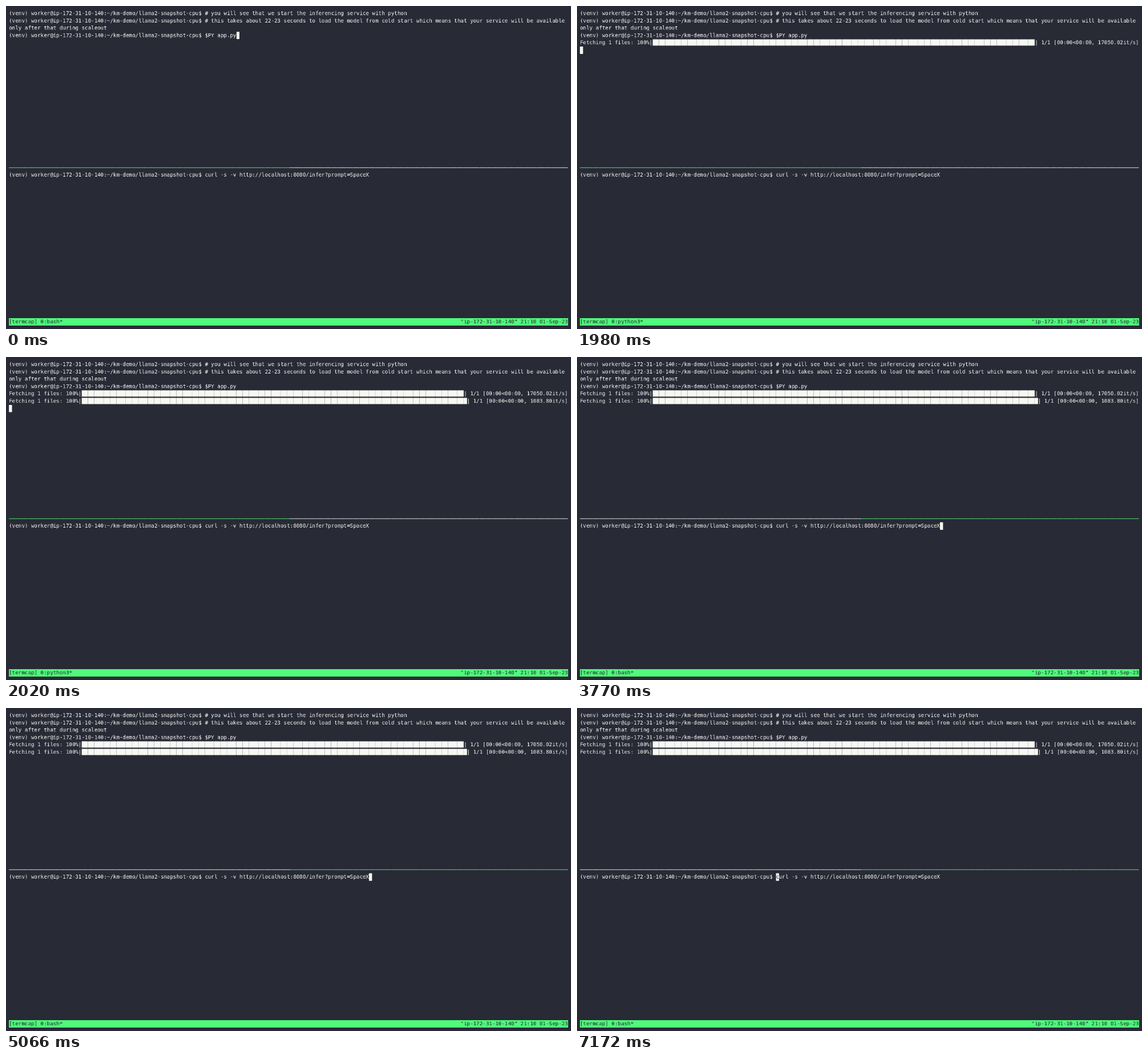
These frames come from a looping animation (990 px wide and 566 px high, 8 s). An HTML page with a canvas:

```html
<!DOCTYPE html>
<html lang="en">
<head>
<meta charset="utf-8">
<title>Terminal session</title>
<style>
  html, body { margin: 0; width: 100%; height: 100%; overflow: hidden; background: #282a36; }
  canvas { display: block; width: 990px; height: 566px; }
</style>
</head>
<body>
<canvas id="screen" width="1508" height="862"></canvas>
<script>
const ctx = document.getElementById('screen').getContext('2d');
const BG = '#282a36', FG = '#f8f8f2', GREEN = '#50fa7b', BLACK = '#21222c';
const COLS = 177, HALF = 89, LOOP = 8000;
const FONT = '14px "DejaVu Sans Mono", monospace';
const PROMPT = '(venv) worker@ip-172-31-10-140:~/km-demo/llama2-snapshot-cpu$ ';
const CURL = PROMPT + 'curl -s -v http://localhost:8080/infer?prompt=SpaceX';
const CLOCK = '"ip-172-31-10-140" 21:10 01-Sep-23';
const SHELL = [
  PROMPT + '# you will see that we start the inferencing service with python',
  PROMPT + '# this takes about 22-23 seconds to load the model from cold start which means that your service will be available',
  'only after that during scaleout',
  PROMPT + '$PY app.py'
];

// start: ms, bars: finished downloads, cursor: [column, row], lower: active pane
const STATES = [
  { start: 0, bars: 0, cursor: [72, 3], job: 'bash' },
  { start: 1490, bars: 0, cursor: [0, 4], job: 'bash' },
  { start: 1980, bars: 1, cursor: [0, 5], job: 'python3' },
  { start: 2020, bars: 2, cursor: [0, 6], job: 'python3' },
  { start: 3770, bars: 2, cursor: [114, 22], job: 'bash', lower: true },
  { start: 5930, bars: 2, cursor: [62, 22], job: 'bash', lower: true }
];

// Cells snap to whole pixels, as in a terminal renderer.
const cellX = col => Math.floor((col + 1) * 59 / 7);
const cellY = row => 10 + Math.round(row * 19.6);

function fillCells(col, row, count, color) {
  ctx.fillStyle = color;
  const x = cellX(col), y = cellY(row);
  ctx.fillRect(x, y, cellX(col + count) - x, cellY(row + 1) - y);
}

function print(text, col, row, color = FG) {
  ctx.fillStyle = color;
  [...text].forEach((ch, i) => {
    if (ch !== ' ') ctx.fillText(ch, cellX(col + i), cellY(row) + 14);
  });
}

function progress(rate) {
  const head = 'Fetching 1 files: 100%|';
  const tail = `| 1/1 [00:00<00:00, ${rate}it/s]`;
  return head + '█'.repeat(COLS - head.length - tail.length) + tail;
}

function draw({ bars, cursor: [col, row], job, lower }) {
  ctx.fillStyle = BG;
  ctx.fillRect(0, 0, 1508, 862);
  ctx.font = FONT;

  const lines = SHELL.concat(['17050.02', '1083.80'].slice(0, bars).map(progress));
  lines.forEach((line, i) => print(line, 0, i));

  print('─'.repeat(HALF), 0, 21, lower ? FG : GREEN);
  print('─'.repeat(COLS - HALF), HALF, 21, lower ? GREEN : FG);
  print(CURL, 0, 22);

  fillCells(0, 42, COLS, GREEN);
  print(`[termcap] 0:${job}*`, 0, 42, BLACK);
  print(CLOCK, COLS - CLOCK.length, 42, BLACK);

  fillCells(col, row, 1, FG);
  const under = (row === 22 ? CURL : lines[row] || '')[col];
  if (under) print(under, col, row, BG);
}

let shown, origin;
function tick(now) {
  origin ??= now;
  const time = (now - origin) % LOOP;
  const state = STATES.findLast(s => s.start <= time);
  if (state !== shown) draw(shown = state);
  requestAnimationFrame(tick);
}
requestAnimationFrame(tick);
</script>
</body>
</html>
```
